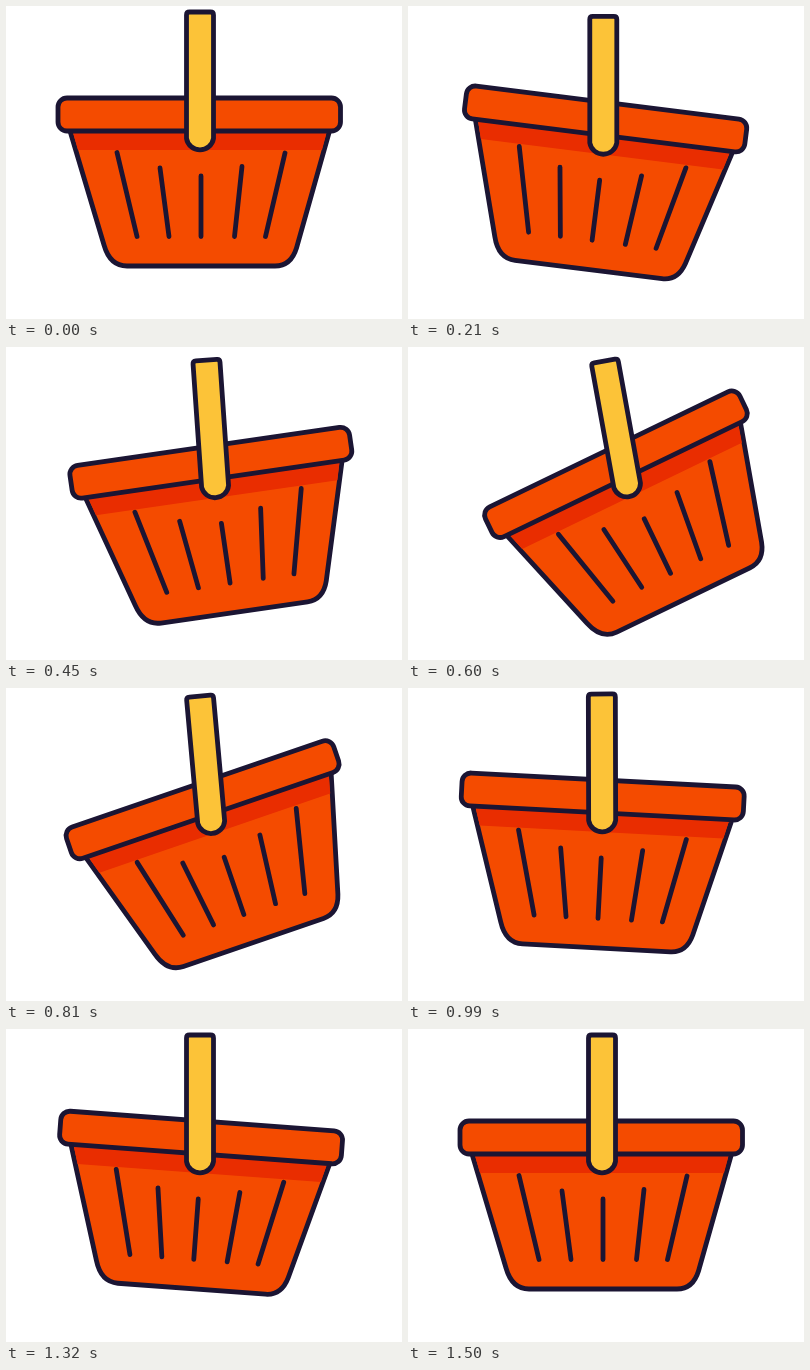
These frames come from a looping animation (396 by 313 pixels, 1530 ms). An HTML page:

```html
<!DOCTYPE html>
<html lang="en">
<head>
<meta charset="utf-8">
<title>Swinging basket</title>
<style>
  html, body { margin: 0; width: 100%; height: 100%; overflow: hidden; background: #fff; }
  svg { display: block; width: 100%; height: 100%; }
</style>
</head>
<body>
<svg viewBox="0 0 396 313" fill="#f44b00" stroke="#1b1533" stroke-width="4.8" stroke-linecap="round" stroke-linejoin="round">
  <g id="whole">
    <g id="basket">
      <path d="M64 125L98 239Q104 260 121 260H269Q285 260 290.500 242L323.500 125Z"/>
      <path d="M66.500 125H321L316 144H72Z" fill="#e92d00" stroke="none"/>
      <path d="M111 146.500L131 230.500M154 162L163 230.500M195 170V230.500M236 160.500L228.500 230.500M279 147L259.500 230.500"/>
      <rect x="52" y="92" width="282.500" height="33" rx="9"/>
    </g>
    <path d="M183.500 6H204.500Q207.500 6 207.500 9V132.500A13.700 13.700 0 0 1 180.500 132.500V9Q180.500 6 183.500 6Z" fill="#fcc338"/>
  </g>
</svg>
<script>
const LOOP = 1530, STEP = 30;
const whole = document.getElementById('whole');
const basket = document.getElementById('basket');

function ease(time, from, to) {
  const u = Math.min(1, Math.max(0, (time - from) / (to - from)));
  return u * u * (3 - 2 * u);
}

// Rises from 0 to 1, holds, then falls back to 0.
function pulse(time, riseFrom, riseTo, fallFrom, fallTo) {
  return ease(time, riseFrom, riseTo) - ease(time, fallFrom, fallTo);
}

function draw(now) {
  const time = Math.floor(now % LOOP / STEP) * STEP;
  const x = 14 * pulse(time, 120, 600, 600, 970);
  const y = 7 * pulse(time, 0, 360, 600, 920);
  const handleTilt = -10.3 * pulse(time, 340, 600, 600, 1020);
  // The basket lags behind the hand, then swings through the other way.
  const basketTilt = 8.5 * pulse(time, 0, 280, 1140, 1500)
    - 35 * pulse(time, 280, 630, 690, 1090);

  whole.setAttribute('transform', `translate(${x} ${y}) rotate(${handleTilt} 194 70)`);
  basket.setAttribute('transform', `rotate(${basketTilt - handleTilt} 194 133)`);
}

const start = performance.now();
function tick() {
  draw(performance.now() - start);
  requestAnimationFrame(tick);
}
tick();
</script>
</body>
</html>
```
